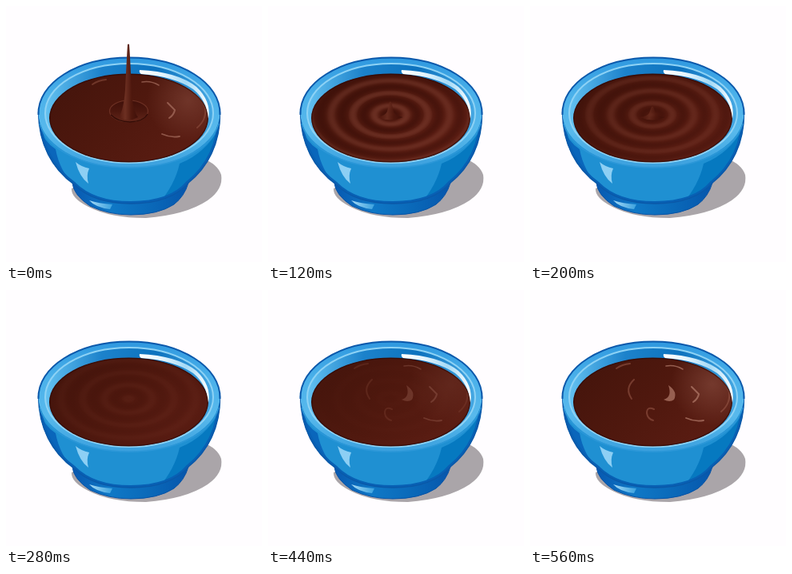
An HTML page with a canvas that plays this animation: 320 by 320 pixels, repeating every 0.6 s.

```html
<!DOCTYPE html>
<html lang="en">
<head>
<meta charset="utf-8">
<title>Chocolate bowl</title>
<style>
html, body { margin: 0; width: 100%; height: 100%; overflow: hidden; background: #fffdff; }
canvas { display: block; width: 320px; height: 320px; }
</style>
</head>
<body>
<canvas id="stage" width="320" height="320"></canvas>
<script>
const ctx = document.getElementById('stage').getContext('2d');
const STEP = 40, STEPS = 15;

// Keys are [step, value] pairs, joined linearly.
function key(table, s) {
  let a = table[0];
  for (const b of table) {
    if (s <= b[0]) return b[0] === a[0] ? b[1] : a[1] + (b[1] - a[1]) * (s - a[0]) / (b[0] - a[0]);
    a = b;
  }
  return a[1];
}

const spikeTop = [[0, 48], [1, 90], [2, 112], [3, 120], [5, 126], [7, 136]];
const spikeAlpha = [[0, 1], [3, .8], [5, .65], [7, 0]];
const waveSize = [[0, 0], [1, .6], [2, .9], [3, 1], [5, .7], [7, .22], [9, .1], [12, .03], [14, 0]];
const waveReach = [[0, 30], [1, 60], [2, 95], [3, 125]];
const glossAlpha = [[0, .85], [1, .5], [2, .18], [3, 0], [7, 0], [9, .22], [12, .5], [14, 1]];
const swirlAlpha = [[0, 0], [7, 0], [9, .2], [12, .5], [14, 1]];
const craterAlpha = [[0, 1], [1, .6], [2, .2], [3, 0]];

function oval(x, y, rx, ry) {
  const p = new Path2D();
  p.ellipse(x, y, rx, ry, 0, 0, Math.PI * 2);
  return p;
}

function blend(x0, y0, x1, y1, ...colors) {
  const g = ctx.createLinearGradient(x0, y0, x1, y1);
  colors.forEach((c, i) => g.addColorStop(i / (colors.length - 1), c));
  return g;
}

function fill(path, style) {
  ctx.fillStyle = style;
  ctx.fill(typeof path === 'string' ? new Path2D(path) : path);
}

function line(path, style, width) {
  ctx.strokeStyle = style;
  ctx.lineWidth = width;
  ctx.stroke(typeof path === 'string' ? new Path2D(path) : path);
}

const rim = oval(154, 133.5, 113.5, 69);
const opening = oval(154, 134, 105, 62);
const surface = oval(153.5, 140, 99.5, 55.5);
const body = new Path2D('M40.5 133C41 172 57 203 85 223C104 242 130 247 156 247C188 247 212 240 228 221C252 202 268 172 267.5 133Z');
const foot = new Path2D('M83 221Q84 236 105 250Q128 261 156 261Q190 261 210 248Q223 238 228 221Z');

function bowl() {
  const shadow = new Path2D('M82 228Q81 240 103 251Q130 265 175 265Q225 261 252 243Q272 229 269 211Q264 197 246 191L150 200Z');
  fill(shadow, '#aaa5a9');
  fill(foot, blend(83, 0, 228, 0, '#0758b0', '#0f78c6', '#0a69b9', '#0656ac'));
  line(foot, '#0753a6', 1);
  fill('M104 243Q116 247 133 248L130 254Q112 252 104 243Z', blend(104, 0, 133, 0, '#a5d9f5', '#3ba1de'));

  fill(body, '#1f90d2');
  ctx.save();
  ctx.clip(body);
  fill('M268 150Q250 184 217 197Q211 224 190 248L250 248L270 190Z', '#0679c0');
  fill('M40 150Q48 170 62 179Q67 206 86 226L70 226L36 190Z', '#0a66bb');
  line(body, '#0860b4', 6);
  ctx.restore();
  line(body, '#0a58a8', 1.4);
  fill('M87 195Q94 201 104 203Q100 212 103 222Q92 214 87 195Z', '#8dcff4');

  fill(rim, blend(0, 65, 0, 203, '#2f98df', '#4bb1ea', '#58b9ec', '#3a9fdd'));
  line('M40.5 136C39 96 90 64.5 154 64.5C218 64.5 269 96 267.5 136', '#0b58ab', 2);
  line('M42 147C52 181 98 202 154 202C210 202 256 181 266 147', '#2b97d8', 1.5);
  fill(opening, blend(50, 0, 258, 0, '#62c0f0', '#1c82cb', '#0d72be', '#45a8e3'));
  line(opening, '#8dd2f5', 2);
}

function gloss(alpha, swirls) {
  if (!alpha) return;
  const shine = 'rgba(188,132,116,.65)', soft = 'rgba(154,90,74,.55)';
  ctx.save();
  ctx.globalAlpha = alpha;
  ctx.lineCap = 'round';
  const g = ctx.createRadialGradient(228, 118, 2, 228, 118, 52);
  g.addColorStop(0, 'rgba(146,86,72,.5)');
  g.addColorStop(1, 'rgba(146,86,72,0)');
  fill(surface, g);
  line('M219 97Q241 108 249 127Q251 142 239 152', soft, 2);
  line('M170 95Q181 93 191 99', shine, 1.5);
  line('M202 121Q207 126 211 130Q210 136 204 140', shine, 2);
  line('M195 160Q206 165 217 163', shine, 1.8);
  line('M108 98Q115 93 125 92', soft, 2);

  ctx.globalAlpha = swirls;
  fill('M173 119Q185 127 180 137Q175 141 167 137Q178 134 173 119Z', shine);
  line('M155 149Q146 145 146 154Q147 161 154 163', soft, 2);
  line('M130 112Q118 123 127 136', soft, 2);
  ctx.restore();
}

// Damped rings, squeezed into the tilt of the surface.
function ripples(s) {
  const size = key(waveSize, s), reach = key(waveReach, s);
  if (!size) return;
  const g = ctx.createRadialGradient(0, 0, 0, 0, 0, 130);
  for (let i = 0; i <= 65; i++) {
    const r = i * 2;
    const edge = Math.max(0, Math.min(1, (reach - r) / 25));
    const w = Math.cos((r - 12.5 - 2.5 * s) * Math.PI * 2 / 27) * size * edge * (1 - r / 240);
    g.addColorStop(i / 65, w > 0 ? `rgba(150,82,66,${w * .42})` : `rgba(40,5,2,${-w * .36})`);
  }
  ctx.save();
  ctx.translate(153, 136);
  ctx.scale(1, .58);
  ctx.fillStyle = g;
  ctx.fillRect(-130, -130, 260, 260);
  ctx.restore();
}

function crater(alpha) {
  if (!alpha) return;
  ctx.save();
  ctx.globalAlpha = alpha;
  const pit = oval(153.5, 131.5, 24, 13.5);
  fill(pit, blend(0, 118, 0, 145, '#40100a', '#4c170e', '#62261a'));
  line(pit, '#6d3023', 1.2);
  line('M131 136Q140 145 155 145Q172 144 177 135', '#320c06', 1.3);
  ctx.restore();
}

function spike(s) {
  const alpha = key(spikeAlpha, s);
  if (!alpha) return;
  const x = 153, base = 139, top = key(spikeTop, s), h = base - top;
  const wide = 12 + 4 * Math.min(1, s);
  const y = f => top + h * f;
  ctx.save();
  ctx.globalAlpha = alpha;
  const p = `M${x - 1} ${top}Q${x} ${top - 1} ${x + 1} ${top}C${x + 2} ${y(.15)} ${x + 3} ${y(.4)} ${x + 4} ${y(.62)}`
    + `Q${x + 5} ${y(.9)} ${x + wide} ${base}Q${x} ${base + 7} ${x - wide} ${base}`
    + `Q${x - 6} ${y(.9)} ${x - 4} ${y(.62)}C${x - 3} ${y(.4)} ${x - 2} ${y(.15)} ${x - 1} ${top}Z`;
  fill(p, blend(x - 12, 0, x + 12, 0, '#531a10', '#6d3022', '#4f180e', '#3f1009'));
  ctx.restore();
}

function draw(s) {
  ctx.fillStyle = '#fffdff';
  ctx.fillRect(0, 0, 320, 320);
  bowl();
  ctx.save();
  ctx.clip(surface);
  fill(surface, blend(90, 85, 200, 195, '#46150c', '#4f180e', '#591c12'));
  ripples(s);
  gloss(key(glossAlpha, s), key(swirlAlpha, s));
  crater(key(craterAlpha, s));
  line(surface, 'rgba(45,8,4,.6)', 3);
  ctx.restore();
  fill('M167 80Q214 82 238 101Q257 119 253 141Q251 118 234 104Q210 88 169 85Q166 83 167 80Z',
    blend(167, 0, 254, 0, '#ffffff', '#e4f4fd', '#a5daf6', '#ffffff'));
  spike(s);
}

let shown = -1;
const start = performance.now();
function tick() {
  const s = Math.floor((performance.now() - start) / STEP) % STEPS;
  if (s !== shown) draw(shown = s);
  requestAnimationFrame(tick);
}
tick();
</script>
</body>
</html>
```
